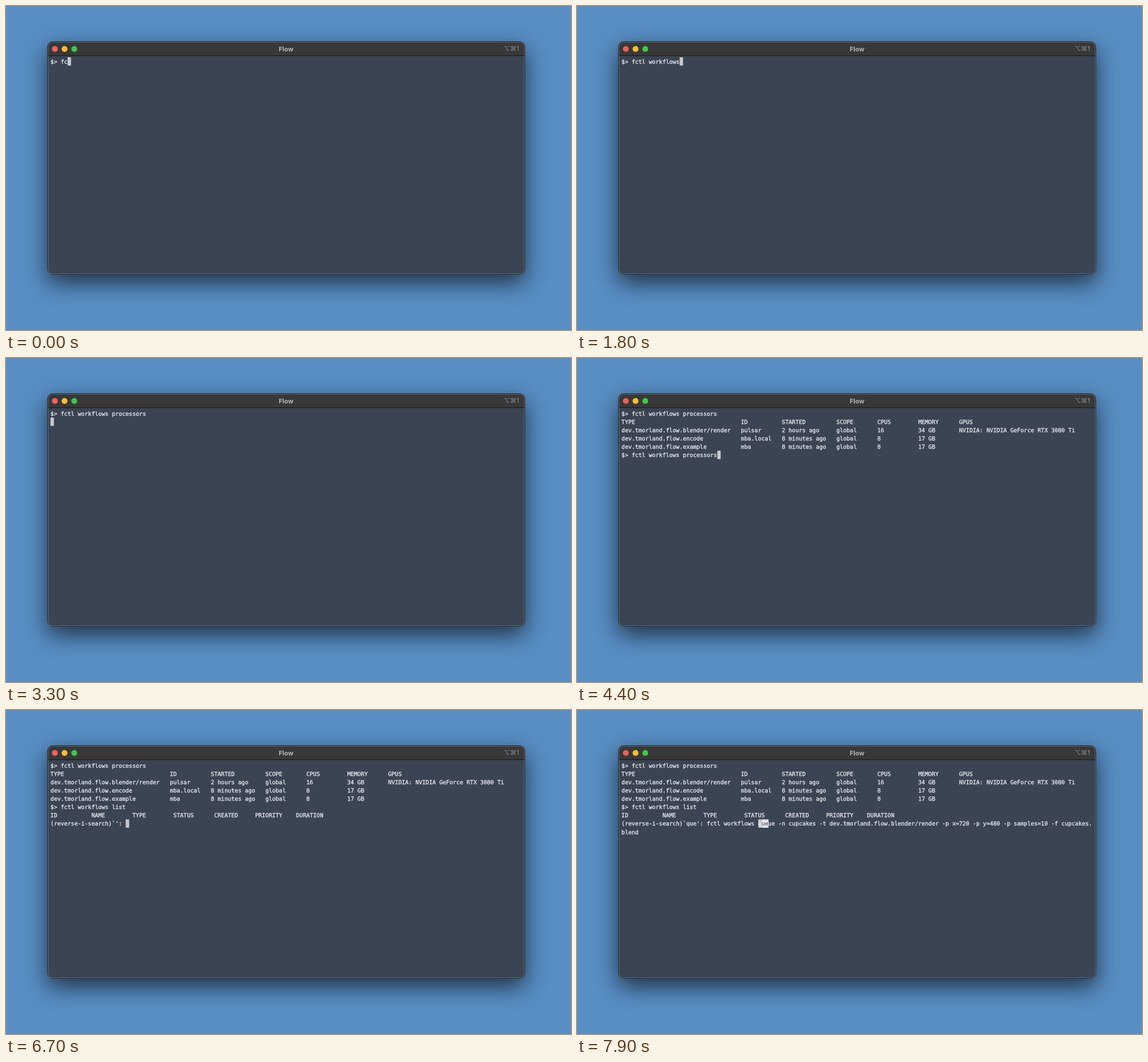
Animation of 960 by 550 pixels, one loop 8 s. Source, as an HTML page:

```html
<!DOCTYPE html>
<html lang="en">
<head>
<meta charset="utf-8">
<title>Terminal</title>
<style>
  html, body { margin: 0; width: 100%; height: 100%; overflow: hidden; background: #588ec4; }
  #window {
    position: absolute; left: 70px; top: 60px; width: 812px; height: 396px;
    box-sizing: border-box; border-radius: 9px; overflow: hidden;
    background: linear-gradient(#383838 24px, #15171a 24px 25px, #3b4452 25px);
    box-shadow: 0 14px 38px rgba(0, 0, 0, .64);
  }
  #window::after {
    content: ""; position: absolute; inset: 0; border-radius: 9px;
    box-shadow: inset 0 0 0 1px #1c2733, inset 0 0 0 2px rgba(255, 255, 255, .22);
  }
  svg { position: absolute; left: 0; top: 0; }
  text { white-space: pre; text-rendering: geometricPrecision; }
  .bar { font: 700 10.8px Inter, "DejaVu Sans", sans-serif; fill: #b8b8b8; }
  .key { font-weight: 600; font-size: 11px; fill: #7d7d7d; }
  .mono { font: 9.65px "DejaVu Sans Mono", monospace; fill: #e8ecf2; stroke: #e8ecf2; stroke-width: .3px; }
  #hit rect { stroke: none; }
  #hit text { fill: #3b4452; stroke: none; }
</style>
</head>
<body>
<div id="window"></div>
<svg width="960" height="550">
  <circle cx="83" cy="73" r="5" fill="#ed6158"/>
  <circle cx="99.5" cy="73" r="5" fill="#f6bd30"/>
  <circle cx="116" cy="73" r="5" fill="#3fc748"/>
  <text class="bar" x="476" y="76.6" text-anchor="middle">Flow</text>
  <text class="bar key" x="872" y="76" text-anchor="end">⌥⌘1</text>
  <rect id="cursor" width="5.8" height="14.1" fill="#c7c9cc"/>
  <g id="rows" class="mono"></g>
  <g id="hit" class="mono"><rect height="14.1" fill="#e5e9f0"/><text></text></g>
</svg>
<script>
const LEFT = 75.6, TOP = 87, CHAR = 5.81, LINE = 14.1, COLS = 138, LOOP = 8000;
const $ = id => document.getElementById(id);
const colX = c => LEFT + c * CHAR;
const rowY = r => TOP + r * LINE;
const base = r => rowY(r) + 10.7;

function put(el, attrs) {
  for (const k in attrs) el.setAttribute(k, attrs[k]);
}

const rows = Array.from({ length: 9 }, (_, r) => {
  const el = document.createElementNS("http://www.w3.org/2000/svg", "text");
  put(el, { x: LEFT, y: base(r) });
  return $("rows").appendChild(el);
});

const table = (line, widths) =>
  line.split("|").map((cell, i) => cell.padEnd(widths[i] || 12)).join("");

const processors = [
  "TYPE|ID|STARTED|SCOPE|CPUS|MEMORY|GPUS",
  "dev.tmorland.flow.blender/render|pulsar|2 hours ago|global|16|34 GB|NVIDIA: NVIDIA GeForce RTX 3080 Ti",
  "dev.tmorland.flow.encode|mba.local|8 minutes ago|global|8|17 GB",
  "dev.tmorland.flow.example|mba|8 minutes ago|global|8|17 GB"
].map(line => table(line, [35, 12, 16]));
const listing = table("ID|NAME|TYPE|STATUS|CREATED|PRIORITY|DURATION", []);
const PROMPT = "$> ";
const FIRST = PROMPT + "fctl workflows processors";
const LIST = PROMPT + "fctl workflows list";
const QUEUE = "fctl workflows queue -n cupcakes -t dev.tmorland.flow.blender/render " +
  "-p x=720 -p y=480 -p samples=10 -f cupcakes.blend";

// Each burst: start time, then what is typed at every 100 ms
const bursts = [
  [0, "fc", "t", "l"], [600, " "], [900, ..."workfl"], [1600, "ow"],
  [1800, "s", " ", "p", "r"], [2300, "o", "ce"], [2600, "s", "s"], [2900, "o", "r", "s"]
];
const typed = t => bursts.map(([start, ...keys]) =>
  keys.filter((_, i) => t >= start + i * 100).join("")).join("");

// Number of keys pressed, one per 100 ms from the start time
const pressed = (t, start, max) =>
  Math.max(0, Math.min(max, Math.floor((t - start) / 100) + 1));

// Lines on screen, plus the matched part during the history search
function screen(t) {
  if (t < 3300) return { lines: [PROMPT + typed(t)] };
  if (t < 3400) return { lines: [FIRST, ""] };
  const lines = [FIRST, ...processors];
  if (t < 4400) return { lines: [...lines, PROMPT] };
  if (t < 4500) return { lines: [...lines, FIRST] };
  if (t < 5300) return { lines: [...lines, LIST.slice(0, 18 + pressed(t, 4700, 4))] };
  lines.push(LIST, listing);
  if (t < 6700) return { lines: [...lines, PROMPT] };
  const match = pressed(t, 7000, 3);
  const head = "(reverse-i-search)`" + "que".slice(0, match) + "': ";
  if (!match) return { lines: [...lines, head] };
  const full = head + QUEUE;
  return {
    lines: [...lines, full.slice(0, COLS), full.slice(COLS)],
    match, col: head.length + QUEUE.indexOf("queue"), row: lines.length
  };
}

function draw(t) {
  const { lines, match = 0, col = lines.at(-1).length, row = lines.length - 1 } = screen(t);
  rows.forEach((el, r) => {
    const line = lines[r] || "";
    if (el.textContent !== line) el.textContent = line;
  });
  put($("cursor"), { x: colX(col), y: rowY(row) });
  const [box, label] = $("hit").children;
  const rest = Math.max(0, match - 1);
  put(box, { x: colX(col + 1), y: rowY(row), width: rest * CHAR });
  put(label, { x: colX(col + 1), y: base(row) });
  label.textContent = "ue".slice(0, rest);
}

const start = performance.now();
function tick() {
  draw((performance.now() - start) % LOOP);
  requestAnimationFrame(tick);
}
tick();
</script>
</body>
</html>
```
